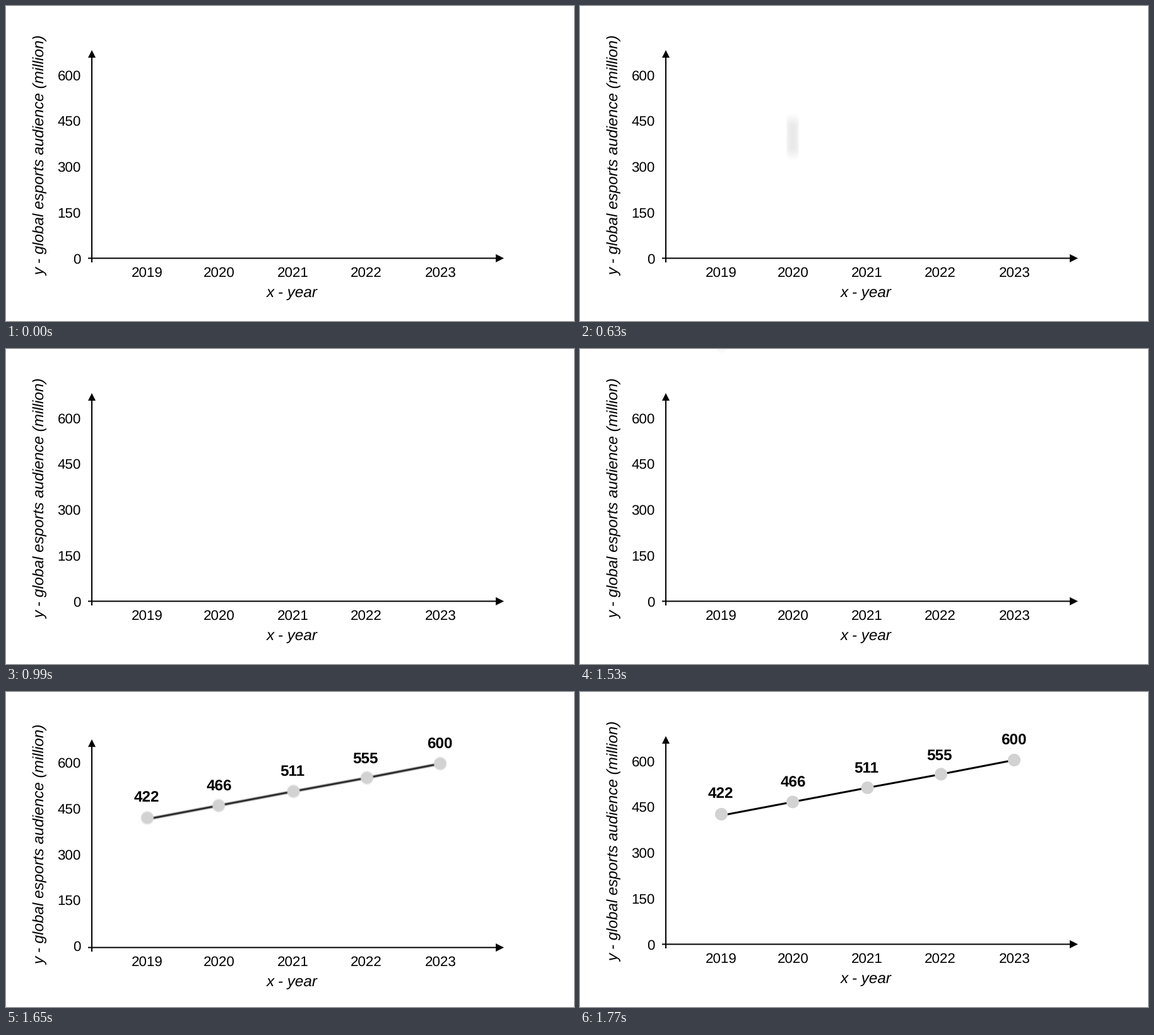
Write a matplotlib script that moves like this. It is 900x500 px and loops after 3.6 s.

```python
import numpy as np
import matplotlib.pyplot as plt
from matplotlib.animation import FuncAnimation

W, H, DPI = 900, 500, 100
FRAMES, INTERVAL = 120, 30
PX = 72 / DPI

plt.rcParams["font.family"] = "Liberation Sans"
plt.rcParams["text.hinting"] = "none"

GREY = 210 / 255
RADIUS = 10
DOT_X = np.array([224, 337, 455.5, 572, 688])
DOT_Y = np.array([194, 174.5, 152, 130.5, 108])
LINE_Y = DOT_Y + [2, 0, 0, 0, 0]

AXIS_X, AXIS_Y = 136, 400.4
SMALL, LARGE = 22.4, 24.2

RISE_START, RISE_GAP, RISE_LIFE = 16, 3, 5
RISE_SPEED = 104
RISE_TOP = [378, 378, 378, 372, 374]
DROP_START, SETTLED = 51, 59

fig = plt.figure(figsize=(W / DPI, H / DPI), dpi=DPI, facecolor="white")
ax = fig.add_axes([0, 0, 1, 1])
ax.axis("off")

rows = np.arange(H)[:, None] + 0.5
cols = np.arange(W)[None, :] + 0.5
blank = np.ones((H, W))


def to_rgb(grey):
    return np.repeat(grey[:, :, None], 3, axis=2)


layer = ax.imshow(to_rgb(blank), extent=(0, W, H, 0), interpolation="nearest",
                  aspect="auto", zorder=0)
ax.set_xlim(0, W)
ax.set_ylim(H, 0)


def paint_dot(img, x, centres, soft=1.0, gain=1.0):
    """Blend a grey disc averaged over all the given centre heights."""
    part = slice(int(x) - 14, int(x) + 15)
    dx = cols[:, part] - x
    cover = 0
    for y in centres:
        dist = np.hypot(dx, rows - y)
        cover = cover + np.clip((RADIUS - dist) / soft + 0.5, 0, 1)
    cover = np.clip(gain * cover / len(centres), 0, 1)
    img[:, part] += (GREY - img[:, part]) * cover


def paint_line(img, offsets):
    part = slice(int(DOT_X[0]), int(DOT_X[-1]))
    y = np.interp(cols[:, part], DOT_X, LINE_Y)
    cover = 0
    for off in offsets:
        cover = cover + np.clip(2 - 0.982 * np.abs(rows - y - off), 0, 1)
    img[:, part] *= 1 - cover / len(offsets)


def rising_dots(k):
    img = blank.copy()
    for i, x in enumerate(DOT_X):
        age = k - RISE_START - RISE_GAP * i
        if not 0 <= age < RISE_LIFE:
            continue
        first = RISE_TOP[i] - RISE_SPEED * age + RADIUS
        length, gain = (55, 1.35) if age else (24, 1.0)
        paint_dot(img, x, np.linspace(first, first + length, 40), 3, gain)
    img[399:] = 1
    return img


def drop(k):
    """Height offset of the chart: fast fall, dip, return to rest."""
    return np.interp(k, [50, 54, 56, SETTLED], [-287, 0, 11.5, 0])


def chart(k):
    img = blank.copy()
    if k < SETTLED:
        offsets = drop(np.linspace(k - 0.25, k + 0.25, 31))
    else:
        offsets = np.zeros(1)
    paint_line(img, offsets)
    for x, y in zip(DOT_X, DOT_Y):
        paint_dot(img, x, y + offsets, 2 if k < SETTLED else 1)
    return img


def text(x, y, s, size, **kw):
    kw = {"ha": "center", "va": "baseline", **kw}
    t = ax.text(x, y, s, fontsize=size * PX, color="black", zorder=3, **kw)
    return t, y


ticks = [text(118.7, 408.6 - 72.8 * i, str(150 * i), SMALL, ha="right")
         for i in range(5)]
names = [text(x, 430, str(2019 + i), SMALL)
         for i, x in enumerate([224.2, 338, 454.7, 571, 688.7])]
names.append(text(453, 462, "x - year", LARGE, style="italic"))
names.append(text(61, 427.5, "y - global esports audience (million)", LARGE,
                  style="italic", ha="left", rotation=90,
                  rotation_mode="anchor"))
values = [text(x, y, s, LARGE, weight="bold") for x, y, s in [
    (223, 168, "422"), (338, 150.6, "466"), (453.5, 127.4, "511"),
    (569.5, 107.4, "555"), (687.5, 84, "600")]]

axis_parts = []
for xs, ys in [([AXIS_X, AXIS_X], [80, 407]),
               ([130, 778], [AXIS_Y, AXIS_Y])]:
    line, = ax.plot(xs, ys, color="black", lw=2 * PX, snap=False,
                    solid_capstyle="butt", zorder=2)
    axis_parts.append((line, np.array([xs, ys], float).T))
for pts in [[(AXIS_X, 70), (142, 82), (130, 82)],
            [(789, AXIS_Y), (776, AXIS_Y + 6.5), (776, AXIS_Y - 6.5)]]:
    head = plt.Polygon(pts, facecolor="black", edgecolor="none", snap=False,
                       zorder=2)
    ax.add_patch(head)
    axis_parts.append((head, np.array(pts, float)))


def shift_texts(group, dy):
    for t, y in group:
        t.set_y(y + dy)


def shift_axes(dy):
    for part, pts in axis_parts:
        moved = pts + [0, dy]
        if isinstance(part, plt.Polygon):
            part.set_xy(moved)
        else:
            part.set_data(moved[:, 0], moved[:, 1])


def update(k):
    landed = k >= DROP_START
    off = drop(k) if landed else 0
    push = max(off, 0)
    shift_axes(0.9 * push)
    shift_texts(names, 0.9 * push)
    shift_texts(ticks, 0.4 * push)
    shift_texts(values, off)
    for t, _ in values:
        t.set_visible(landed)
    layer.set_data(to_rgb(chart(k) if landed else rising_dots(k)))
    return []


anim = FuncAnimation(fig, update, frames=FRAMES, interval=INTERVAL,
                     init_func=lambda: update(0), repeat=True, repeat_delay=0,
                     blit=False)
plt.show()
```
